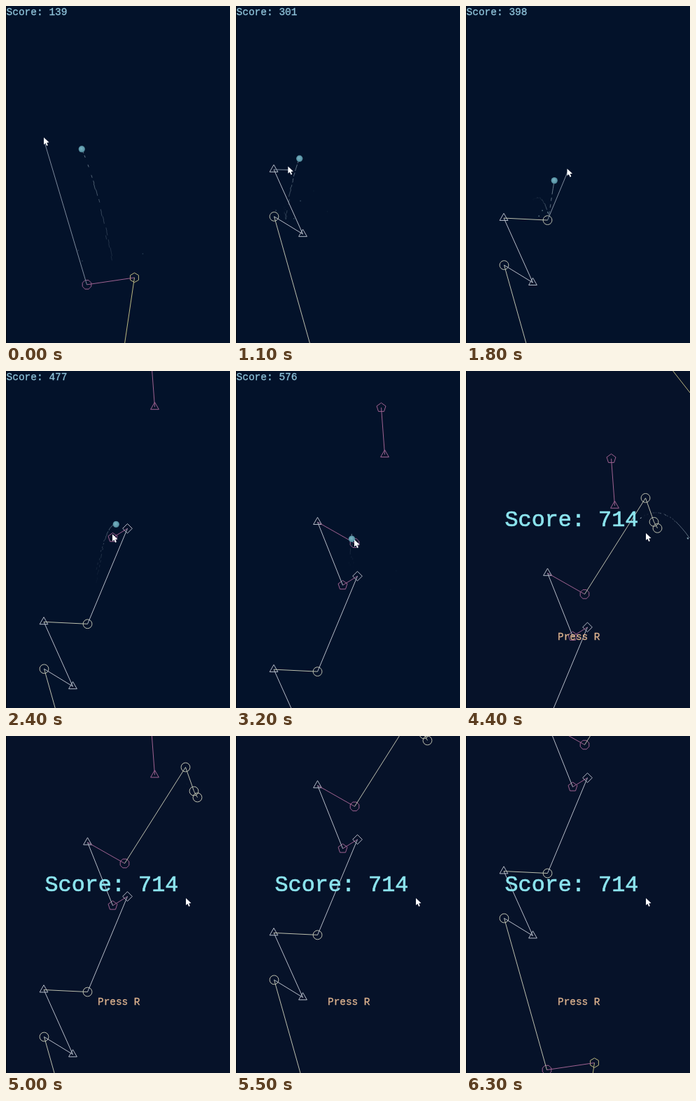
Recreate the animation shown at these times as an HTML page with a canvas. Size 320 by 480 pixels, loop 6400 ms.

```html
<!DOCTYPE html>
<html lang="en">
<head>
<meta charset="utf-8">
<title>Constellation climb</title>
<style>
html, body { margin: 0; width: 100%; height: 100%; overflow: hidden; background: #03122a; }
canvas { display: block; }
</style>
</head>
<body>
<canvas id="stage" width="320" height="480"></canvas>
<script>
const ctx = document.getElementById('stage').getContext('2d');
const LOOP = 6.4, STEP = 0.1, OVER = 4.35, FINAL_SCORE = 714;
const GRAVITY = 500, TRAIL_LIFE = 0.62, SPARK_LIFE = 0.7;
const MONO = '"Liberation Mono", "DejaVu Sans Mono", monospace';
const PINK = '#9f6291', WHITE = '#b6bcc8', YELLOW = '#bbb780', CREAM = '#bcbfae';

// Star colour by number of sides; 0 is a circle
const tint = { 0: CREAM, 3: WHITE, 4: WHITE, 5: PINK, 6: YELLOW, 8: PINK };

// The player's chain of stars: time placed, world x, world y, sides
const stars = [
  [-1, 183, 465, 6], [-1, 115, 475, 8], [0.1, 54, 259, 0], [0.5, 95, 284, 3],
  [0.9, 53.5, 192, 3], [1.5, 116, 195, 0], [2.1, 173, 59, 4], [2.4, 152, 72, 5],
  [2.8, 116, -18, 3], [3.2, 169, 12, 8], [3.6, 256, -125, 0], [3.9, 268, -91, 0],
  [4, 273, -82, 0]
];

// The ball flies a gravity arc between these: time, world x, world y
const bounces = [
  [-0.5, 152, 445], [0.45, 68, 242], [0.7, 70, 263], [1.65, 118, 188],
  [2.54, 164, 59], [3.2, 165, 6], [3.65, 230, -80], [OVER, 320, -66]
];

// The pointer reaches each star's place as it is set, then rests
const pointer = stars.slice(2).map(([t, x, y]) => [t, x, y + cameraAt(t) - 4]);
pointer.push([4.2, 257, 231]);

function cameraAt(t) {
  if (t < OVER) return -79 + 113.9 * t - 5.2 * t * t;
  return -140 + 445 * Math.exp(-0.61 * (t - 4.4));
}

function scoreAt(t) {
  const height = cameraAt(t) + 79;
  return Math.round(139 + height * (1.337 + 0.000213 * height));
}

function segmentAt(keys, t) {
  let i = 0;
  while (i < keys.length - 2 && t >= keys[i + 1][0]) i++;
  return [keys[i], keys[i + 1]];
}

function pointerAt(t) {
  const [a, b] = segmentAt(pointer, t);
  const u = Math.min(1, Math.max(0, (t - a[0]) / (b[0] - a[0])));
  return [a[1] + (b[1] - a[1]) * u, a[2] + (b[2] - a[2]) * u];
}

function ballAt(t) {
  const [a, b] = segmentAt(bounces, t);
  const span = b[0] - a[0], dt = t - a[0];
  const vy = (b[2] - a[2]) / span - GRAVITY * span / 2;
  return [a[1] + (b[1] - a[1]) * dt / span, a[2] + vy * dt + GRAVITY * dt * dt / 2];
}

function random(seed) {
  const v = Math.sin(seed * 12.9898) * 43758.5453;
  return v - Math.floor(v);
}

function line(x1, y1, x2, y2, color) {
  ctx.strokeStyle = color;
  ctx.beginPath();
  ctx.moveTo(x1, y1);
  ctx.lineTo(x2, y2);
  ctx.stroke();
}

function star(x, y, sides, color = tint[sides]) {
  ctx.strokeStyle = color;
  ctx.beginPath();
  if (!sides) ctx.arc(x, y, 6.4, 0, Math.PI * 2);
  const turn = sides === 8 ? Math.PI / 8 : 0;
  for (let i = 0; i < sides; i++) {
    const a = i / sides * Math.PI * 2 - Math.PI / 2 + turn;
    ctx.lineTo(x + Math.cos(a) * 6.8, y + Math.sin(a) * 6.8);
  }
  ctx.closePath();
  ctx.stroke();
}

function text(str, x, y, size, color) {
  ctx.font = `${size}px ${MONO}`;
  ctx.fillStyle = ctx.strokeStyle = color;
  ctx.lineWidth = size * 0.022;
  ctx.fillText(str, x, y);
  ctx.strokeText(str, x, y);
}

function drawConstellations(t) {
  let [, lastX, lastY] = [0, 169, 559];
  const placed = stars.filter(s => s[0] <= t + 1e-6);
  for (const [, x, y, sides] of placed) {
    line(lastX, lastY, x, y, tint[sides]);
    star(x, y, sides);
    [lastX, lastY] = [x, y];
  }
  if (placed.length < stars.length) {
    const [x, y] = pointerAt(t);
    line(lastX, lastY, x, y + 4 - cameraAt(t), '#7d8a9c');
  }
  line(207, -181, 212, -114, PINK);
  star(207, -181, 5);
  star(212, -114, 3, PINK);
  line(270, -338, 325, -268, YELLOW);
}

function drawTrail(t) {
  const gap = 0.014;
  const first = Math.ceil(Math.max(t - TRAIL_LIFE, bounces[0][0]) / gap);
  const last = Math.floor(Math.min(t, OVER) / gap);
  for (let i = first; i < last; i++) {
    if (random(i + 70) < 0.25) continue;
    const age = (t - i * gap) / TRAIL_LIFE;
    const [x1, y1] = ballAt(i * gap), [x2, y2] = ballAt((i + 1) * gap);
    const shift = (random(i + 200) - 0.5) * 8 * age * age;
    ctx.globalAlpha = 0.65 * (1 - age);
    line(x1 + shift, y1, x2 + shift, y2, '#a9bcc8');
  }
}

function drawSparks(t) {
  ctx.fillStyle = '#9fc0cc';
  bounces.forEach(([start, x, y], n) => {
    const age = t - start;
    if (age < 0 || age > SPARK_LIFE) return;
    ctx.globalAlpha = 0.75 * (1 - age / SPARK_LIFE);
    for (let i = 0; i < 3; i++) {
      const vx = (random(n * 9 + i) - 0.5) * 200, vy = (random(n * 9 + i + 4) - 0.7) * 120;
      ctx.fillRect(x + vx * age, y + vy * age, 1.5, 1.5);
    }
  });
}

function drawBall(t) {
  const [x, y] = ballAt(t);
  const glow = ctx.createRadialGradient(x - 1, y - 1, 0, x, y, 5);
  glow.addColorStop(0, '#79b3c2');
  glow.addColorStop(0.75, '#5b96a8');
  glow.addColorStop(1, '#3a6679');
  ctx.fillStyle = glow;
  ctx.beginPath();
  ctx.arc(x, y, 4.7, 0, Math.PI * 2);
  ctx.fill();
}

function drawPointer(t) {
  const [x, y] = pointerAt(t);
  ctx.fillStyle = '#fff';
  ctx.beginPath();
  for (const [dx, dy] of [[0, 0], [0, 10], [2.4, 8], [4.2, 12], [5.8, 11], [4.2, 7.4], [7.5, 7]]) {
    ctx.lineTo(x + dx, y + dy);
  }
  ctx.fill();
}

function draw(t) {
  const over = t >= OVER;
  ctx.fillStyle = over ? '#061229' : '#03122a';
  ctx.fillRect(0, 0, 320, 480);

  ctx.save();
  ctx.translate(0.5, cameraAt(t) + 0.9);
  ctx.lineWidth = 1;
  drawTrail(t);
  drawSparks(t);
  ctx.globalAlpha = 1;
  drawConstellations(t);
  if (!over) drawBall(t);
  ctx.restore();

  if (over) {
    text('Score: ' + FINAL_SCORE, 55.5, 220.5, 31.8, '#8ce4ee');
    text('Press R', 131, 382.5, 14.4, '#dcb28e');
  } else {
    text('Score: ' + scoreAt(t), 0.5, 13, 14.5, '#8fc3da');
  }
  drawPointer(t);
  ctx.fillStyle = '#01060f';
  ctx.fillRect(0, 0, 1, 480);
}

const began = performance.now();
function tick() {
  const t = (performance.now() - began) / 1000 % LOOP;
  draw(Math.floor(t / STEP + 1e-6) * STEP);
  requestAnimationFrame(tick);
}
tick();
</script>
</body>
</html>
```
